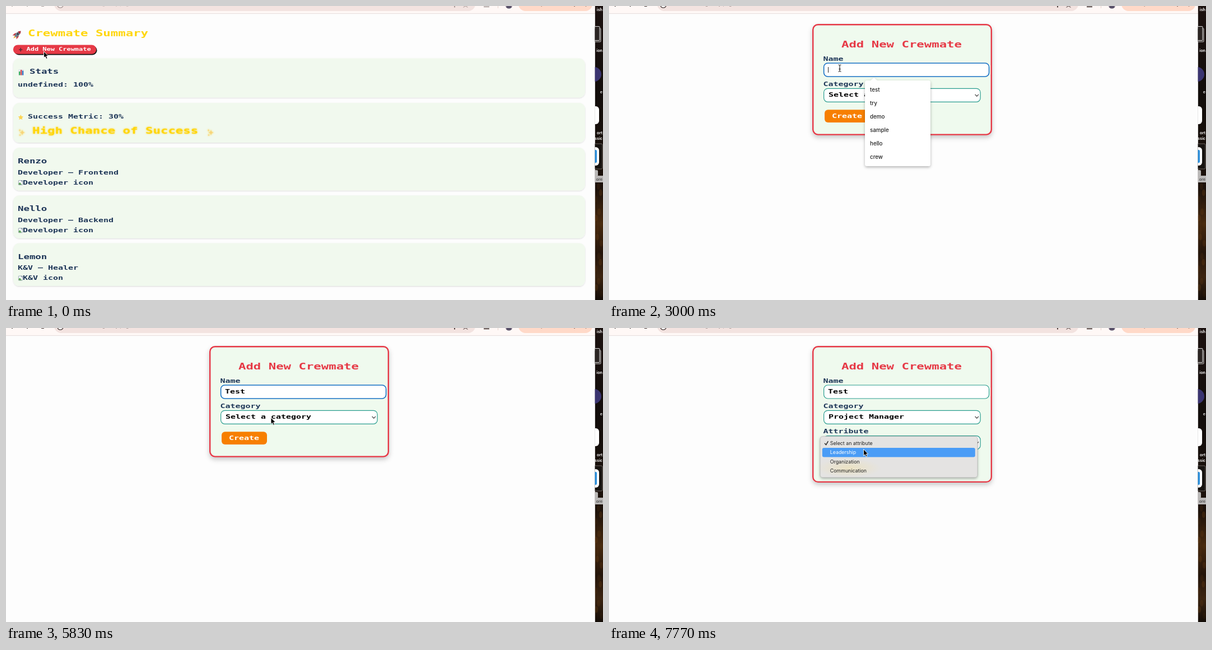
Animation, 1066 px wide and 525 px high, one loop 8 s. Source, as an HTML page:

```html
<!DOCTYPE html>
<html lang="en">
<head>
<meta charset="utf-8">
<title>Crewmate Summary</title>
<style>
  html, body { margin: 0; width: 100%; height: 100%; overflow: hidden; background: #fdfdfd; }
  svg { display: block; width: 1066px; height: 525px; }
  .px { font-family: "DejaVu Sans Mono", monospace; font-weight: 700; white-space: pre; }
  .ui { font-family: Inter, "Open Sans", sans-serif; }
</style>
</head>
<body>
<svg id="stage" viewBox="0 0 1066 525" xmlns="http://www.w3.org/2000/svg">
  <defs>
    <linearGradient id="wood" x2="0" y2="1">
      <stop offset="0" stop-color="#1c1210"/>
      <stop offset=".3" stop-color="#120d0b"/>
      <stop offset=".62" stop-color="#1d120b"/>
      <stop offset=".74" stop-color="#46290f"/>
      <stop offset=".84" stop-color="#24150b"/>
      <stop offset=".92" stop-color="#3b2411"/>
      <stop offset="1" stop-color="#140d08"/>
    </linearGradient>
    <radialGradient id="tint">
      <stop offset="0" stop-color="#ece2bf" stop-opacity=".9"/>
      <stop offset="1" stop-color="#ece2bf" stop-opacity="0"/>
    </radialGradient>
    <filter id="soft" x="-10%" y="-10%" width="120%" height="125%">
      <feDropShadow dx="0" dy="4" stdDeviation="4" flood-opacity=".22"/>
    </filter>
    <filter id="low" x="-5%" y="-10%" width="110%" height="125%">
      <feDropShadow dx="0" dy="1" stdDeviation=".8" flood-opacity=".14"/>
    </filter>
    <filter id="pop" x="-15%" y="-20%" width="130%" height="150%">
      <feDropShadow dx="0" dy="2" stdDeviation="2.6" flood-opacity=".3"/>
    </filter>
  </defs>
  <rect width="1066" height="525" fill="#fdfdfd"/>
  <g id="scene"></g>
  <g id="chrome"></g>
  <g id="side"></g>
  <g id="pointer"></g>
</svg>
<script>
const LOOP = 8000;
const NAVY = '#1d3557', RED = '#e63946', GOLD = '#ffd60a', MINT = '#f1f9ee',
      TEAL = '#2a9d8f', BLUE = '#1670c4', ORANGE = '#f77f00';
const $ = id => document.getElementById(id);

const rect = (x, y, w, h, r, fill, more = '') =>
  `<rect x="${x}" y="${y}" width="${w}" height="${h}" rx="${r}" fill="${fill}" ${more}/>`;
const path = (d, fill, more = '') => `<path d="${d}" fill="${fill}" ${more}/>`;
const circle = (x, y, r, fill, more = '') => `<circle cx="${x}" cy="${y}" r="${r}" fill="${fill}" ${more}/>`;
const esc = s => s.replace(/&/g, '&amp;');

// Extended monospaced face: one aspect for all lettering, pitch is the advance of a character.
const ASPECT = 1.4, ADVANCE = 0.602;
const px = (str, x, y, pitch, fill) =>
  `<text class="px" transform="translate(${x} ${y}) scale(${ASPECT} 1)"
    font-size="${pitch / ASPECT / ADVANCE}" fill="${fill}">${esc(str)}</text>`;
const ui = (str, x, y, size, fill, more = '') =>
  `<text class="ui" x="${x}" y="${y}" font-size="${size}" fill="${fill}" ${more}>${esc(str)}</text>`;

// ---- small pictures ----
function spark(x, y, r) {
  const k = r * 0.22;
  return path(`M${x} ${y - r}L${x + k} ${y - k}L${x + r} ${y}L${x + k} ${y + k}L${x} ${y + r}L${x - k} ${y + k}L${x - r} ${y}L${x - k} ${y - k}Z`, '#f8d27a');
}
const sparkles = (x, y) => spark(x + 7, y + 7, 5) + spark(x + 2.6, y + 3, 2.4) + spark(x + 3, y + 11.4, 2.2);

function star(x, y, r) {
  let d = '';
  for (let i = 0; i < 10; i++) {
    const a = -Math.PI / 2 + i * Math.PI / 5, q = i % 2 ? r * 0.48 : r;
    d += (i ? 'L' : 'M') + (x + q * Math.cos(a)).toFixed(2) + ' ' + (y + q * Math.sin(a)).toFixed(2);
  }
  return path(d + 'Z', '#fcd452');
}
const rocket = `<g transform="translate(20 51) rotate(45)">` +
  path('M-2 4L-5 7L-4.5 1L-2.5 -1ZM2 4L5 7L4.5 1L2.5 -1Z', '#c8323c') +
  path('M-1.6 5L0 9.5L1.6 5Z', '#f5a623') +
  path('M0 -9C3.8 -5 3.6 1 2.2 5H-2.2C-3.6 1 -3.8 -5 0 -9Z', '#6f7f8c') +
  path('M0 -9C1.6 -7.4 2.4 -5.8 2.7 -4.2H-2.7C-2.4 -5.8 -1.6 -7.4 0 -9Z', '#b52d38') +
  circle(0, -1.5, 1.5, '#26313d') + '</g>';
const chart = rect(22, 113, 10, 11, 1, '#e4e9ec') + rect(23, 117, 2.4, 6.5, 0, '#3aa655') +
  rect(25.9, 114, 2.4, 9.5, 0, '#d8434e') + rect(28.8, 115.5, 2.4, 8, 0, '#3178c6');
const broken = y => rect(22.4, y, 7, 8, 0.5, '#f8fbff', 'stroke="#8b98a5" stroke-width=".8"') +
  path(`M22.8 ${y + 7.6}V${y + 5}L25 ${y + 3.4}L28 ${y + 7.6}Z`, '#5fa557') +
  path(`M26 ${y}L29.6 ${y + 3.4}V${y}Z`, '#8b98a5');

// ---- pages ----
const card = (y, h) => rect(13, y, 1021, h, 11, MINT, 'filter="url(#low)"');

function person(y, name, role, icon) {
  return card(y, 76.5) + px(name, 21, y + 28, 10.45, NAVY) + px(role, 21, y + 47.5, 9, NAVY) +
    broken(y + 58.5) + px(icon, 30, y + 65.7, 9, NAVY);
}

function summary(s) {
  const g = (1 - Math.cos(2 * Math.PI * (s.at + 150) / 1500)) / 2;
  const blur = (1.1 + 3 * g).toFixed(2);
  return rocket + px('Crewmate Summary', 39, 54, 13.44, GOLD) +
    rect(14.5, 71, 148, 16.4, 8.2, '#151515') + rect(12.8, 69.4, 148.4, 16.4, 8.2, RED) +
    path('M23 78H29.4M26.2 74.8V81.2', 'none', 'stroke="#5b2a35" stroke-width="1.6"') +
    px('Add New Crewmate', 36.6, 80.2, 7.2, '#fff') +
    card(93.5, 70) + chart + px('Stats', 42, 121, 10.45, NAVY) +
    px('undefined: 100%', 21, 144, 9, NAVY) +
    card(173, 71) + star(26.3, 199, 5) + px('Success Metric: 30%', 39, 201, 9, NAVY) +
    `<g style="filter:drop-shadow(0 0 ${blur}px rgba(255,206,0,${(0.9 - 0.15 * g).toFixed(2)}))">` +
    sparkles(22, 219) + px('High Chance of Success', 47, 228, 13.48, GOLD) + sparkles(359, 219) + '</g>' +
    person(253, 'Renzo', 'Developer — Frontend', 'Developer icon') +
    person(338.3, 'Nello', 'Developer — Backend', 'Developer icon') +
    person(423.6, 'Lemon', 'K&V — Healer', 'K&V icon');
}

const field = (y, w, on) =>
  rect(383.6, y, w, 24, 7, '#fff', `stroke="${on ? BLUE : TEAL}" stroke-width="${on ? 1.6 : 1.2}"`);
const select = (y, label, on) => field(y, 279.5, on) + px(label, 392, y + 15, 9, '#000') +
  path(`M653.6 ${y + 10.6}L656.8 ${y + 13.8}L660 ${y + 10.6}`, 'none', 'stroke="#333" stroke-width="1.1"');

const WORDS = ['test', 'try', 'demo', 'sample', 'hello', 'crew'];
function suggest(list) {
  const h = 33 + 24 * (list.length - 1);
  return `<g filter="url(#pop)">` + rect(457, 133, 117, h, 4, '#fff') +
    path('M467 133.5L473 128L479 133.5Z', '#fff') + '</g>' +
    list.map((w, i) => ui(w, 466, 153 + 24 * i, 9.8, '#222', 'font-weight="500"')).join('');
}

const MENUS = {
  cat: { y: 148, tip: 196, items: ['Select a category', 'Project Manager', 'Developer', 'K&V Fighter', 'K&V Mage'] },
  attr: { y: 193.6, tip: 242, items: ['Select an attribute', 'Leadership', 'Organization', 'Communication'] }
};
function menu(m, hot) {
  const step = 16.45, h = m.items.length * step + 7.5;
  return rect(377, m.y, 281, h, 4.5, '#e4e3e2', 'filter="url(#pop)"') +
    `<ellipse cx="428" cy="${m.tip + 8}" rx="58" ry="${Math.min(34, m.y + h - m.tip - 8)}" fill="url(#tint)"/>` +
    rect(377, m.y, 281, h, 4.5, 'none', 'stroke="#a9a9a9" stroke-width=".6"') +
    m.items.map((label, i) => {
      const mid = m.y + 12 + i * step, on = i === hot;
      return (on ? rect(380.8, mid - 8, 273, 16.4, 3, '#4a9cf6') : '') +
        (i ? '' : path(`M385.4 ${mid + 0.6}L387.6 ${mid + 3}L391 ${mid - 3}`, 'none',
          'stroke="#222" stroke-width="1.4" stroke-linecap="round"')) +
        ui(label, 394.8, mid + 3.1, 8.8, on ? '#fff' : '#222');
    }).join('');
}

function form(s) {
  const grow = s.grown ? 45.3 : 0;
  let out = rect(364.2, 33.2, 318.6, 196.4 + grow, 9, '#effaee', `stroke="${RED}" stroke-width="2.4" filter="url(#soft)"`) +
    px('Add New Crewmate', 415, 74.3, 13.44, RED) +
    px('Name', 382.5, 98, 9, NAVY) + field(102, 295, s.focus === 'name') +
    px(s.name, 391, 117, 9, '#000') +
    px('Category', 382.5, 143, 9, NAVY) + select(147.3, s.cat, s.focus === 'cat');
  if (s.caret) out += rect(391 + 9 * s.name.length - (s.name ? 0.5 : 0), 109, 0.9, 10, 0, '#111');
  if (s.grown) out += px('Attribute', 382.5, 188.4, 9, NAVY) + select(192.7, 'Select an attribute', s.focus === 'attr');
  out += rect(385, 185.3 + grow, 81, 22.6, 6, ORANGE) + px('Create', 398, 200 + grow, 9, '#fff');
  if (s.words) out += suggest(s.words);
  if (s.menu) out += menu(MENUS[s.menu], s.hot);
  return out;
}

// ---- surroundings ----
function chrome(s) {
  const dark = s.active ? 1 : 0.45, ink = '#453634';
  const mark = (x, y, w, h) => rect(x, y, w, h, 0.5, ink, `opacity="${dark}"`);
  return rect(0, 0, 1052, 13.5, 0, '#fff8f6') + rect(0, 13, 1052, 1, 0, '#e6dedc') +
    rect(86, -16, 752, 25, 12.5, '#f3e3e0') +
    circle(97, -2, 5.2, '#fff', `stroke="${ink}" stroke-width="1.3" opacity="${dark}"`) +
    ui('localhost:5173/gallery/page', 108, -1.2, 9, '#8d7d7a', `opacity="${dark}"`) +
    mark(10, 0, 2, 1) + mark(37, 0, 2, 1) + mark(63, 0, 5, 1) +
    mark(800, 0, 2, 2.5) + path('M816.5 2.4L820.5 0L824.5 2.4', 'none', `stroke="${ink}" opacity="${dark}"`) +
    mark(853, 0.6, 10, 1.6) + rect(878, 0, 0.8, 4, 0, '#e3cbc5') +
    circle(898, -2, 6.6, '#b9a6b4') + path('M892.8 2C894 -1.6 902 -1.6 903.2 2A6.6 6.6 0 0 1 892.8 2Z', '#575068') +
    rect(915, -17, 132, 26, 12.5, '#ffd9c8') +
    ui('Update is ready', 948, -1.2, 9.5, '#4c2c22') + circle(1035.5, -0.5, 1.1, '#4c2c22');
}

const side = (() => {
  const tag = (str, y, fill = '#fff') => ui(str, 1065, y, 7.2, fill, 'text-anchor="end" font-weight="600"');
  let out = rect(1051.6, 0, 15, 525, 0, 'url(#wood)');
  for (let i = 0; i < 18; i++) {
    const y = 322 + i * 11.3, x = 1058 + 5 * Math.sin(i * 2.3);
    out += `<ellipse cx="${x.toFixed(1)}" cy="${y.toFixed(1)}" rx="3" ry="6" fill="#7a4816" opacity="${(0.14 + 0.12 * Math.sin(i * 1.7)).toFixed(2)}"/>`;
  }
  return `<svg x="1051.6" y="0" width="14.4" height="525" viewBox="1051.6 0 14.4 525">` + out +
    tag('ish', 9) +
    rect(1044, 40, 18, 24, 1, '#38302d', 'stroke="#bbb" stroke-width="1"') +
    rect(1042, 36.5, 18, 25, 1, '#2b2523', 'stroke="#ddd" stroke-width="1"') +
    tag('ion', 82.4) + circle(1050, 122, 13, '#3a3470') + tag('e', 155.8, '#ddd') +
    rect(1030, 179, 29, 32, 6, '#fff') +
    tag('ort', 228.6) + tag('ssic', 238.6) +
    rect(1030, 246, 35, 45, 2, '#171310', 'stroke="#776f6a" stroke-width=".9"') +
    rect(1030, 252, 29, 33, 6, '#fff') + rect(1037, 257, 18, 23, 2, '#2a8fdc') +
    rect(1040, 293, 17, 11, 2, '#b9b7b6') + rect(1040, 303, 28, 12, 2, '#b9b7b6') +
    tag('ore', 311.6, '#555') + '</svg>';
})();

const BEAM = 'M-2.5 -6C-1 -6 0 -5.6 0 -4.6C0 -5.6 1 -6 2.5 -6M0 -4.6V4.8M-2.5 6.2C-1 6.2 0 5.8 0 4.8C0 5.8 1 6.2 2.5 6.2M-1.6 1.6H1.6';
const POINTERS = {
  arrow: path('M0 0V11.6L2.6 9.3L4.4 13.4L6.5 12.5L4.7 8.5H8.2Z', '#000', 'stroke="#fff" stroke-width=".9"'),
  hand: path('M-1.2 .8C-1.2 -.6 1 -.6 1 .8V5C1.6 4.2 3 4.4 3.1 5.3C3.8 4.7 4.8 5 4.9 5.9C5.8 5.5 6.5 6 6.5 7V10C6.5 12 5.6 12.6 5.4 14H-.2C-.8 12 -3 10.4 -4 8.4C-4.6 7.2 -3 6.4 -2.2 7.4L-1.2 8.6Z',
    '#fff', 'stroke="#000" stroke-width=".9"') + path('M1.1 9.5V12M2.9 9.5V12M4.6 9.5V12', 'none', 'stroke="#000" stroke-width=".6"'),
  beam: path(BEAM, 'none', 'stroke="#fff" stroke-width="2.2" opacity=".7"') + path(BEAM, 'none', 'stroke="#000" stroke-width="1"')
};

const at = (kind, x, y) => ({ kind, x, y });
const STEPS = [
  [0, { page: summary, cur: at('arrow', 67.5, 81), active: false, name: '', cat: 'Select a category' }],
  [150, { active: true, cur: at('hand', 68, 81) }],
  [300, {}], [450, {}],
  [900, { cur: at('hand', 76, 80.5) }],
  [1050, { cur: at('hand', 88, 79.5) }],
  [1200, { cur: at('hand', 95, 79) }],
  [1350, { cur: at('hand', 97, 78.5) }],
  [1650, {}], [1800, {}],
  [1950, { page: form, cur: at('arrow', 96.5, 77) }],
  [2400, { cur: at('arrow', 255, 96) }],
  [2550, { cur: at('arrow', 376.5, 120) }],
  [2850, { cur: at('beam', 410, 112), focus: 'name', caret: true }],
  [3000, { cur: at('beam', 412, 111), words: WORDS }],
  [3600, { caret: false }],
  [4050, { name: 'T', caret: true, words: ['try'] }],
  [4350, { name: 'Te', words: null }],
  [4650, { name: 'Test' }],
  [5100, { caret: false }],
  [5250, { cur: at('beam', 417, 117) }],
  [5400, { cur: at('arrow', 436, 136) }],
  [5550, { cur: at('arrow', 458, 152) }],
  [5700, { cur: at('arrow', 470, 158) }],
  [5830, { cur: at('arrow', 473, 160) }],
  [5980, { focus: null, menu: 'cat' }],
  [6130, { cur: at('arrow', 474, 164) }],
  [6280, { cur: at('arrow', 475, 170) }],
  [6430, { cur: at('arrow', 476, 173.5) }],
  [6580, { hot: 1 }],
  [6730, { menu: null, hot: -1, cat: 'Project Manager', focus: 'cat' }],
  [6880, { grown: true, cur: at('arrow', 468, 192) }],
  [7170, { focus: null, menu: 'attr', cur: at('arrow', 457, 205) }],
  [7320, { cur: at('arrow', 455, 205) }],
  [7620, { cur: at('arrow', 454.5, 212) }],
  [7770, { hot: 1, cur: at('arrow', 454.5, 216.5) }]
];
let state = {};
const SCENES = STEPS.map(([time, change]) => state = { ...state, ...change, at: time });

let shown = -1;
function render(t) {
  let i = SCENES.length - 1;
  while (SCENES[i].at > t) i--;
  if (i === shown) return;
  shown = i;
  const s = SCENES[i];
  $('scene').innerHTML = s.page(s);
  $('chrome').innerHTML = chrome(s);
  $('pointer').innerHTML = `<g transform="translate(${s.cur.x} ${s.cur.y})">${POINTERS[s.cur.kind]}</g>`;
}

$('side').innerHTML = side;
const start = performance.now();
function tick() {
  render((performance.now() - start) % LOOP);
  requestAnimationFrame(tick);
}
tick();
</script>
</body>
</html>
```
